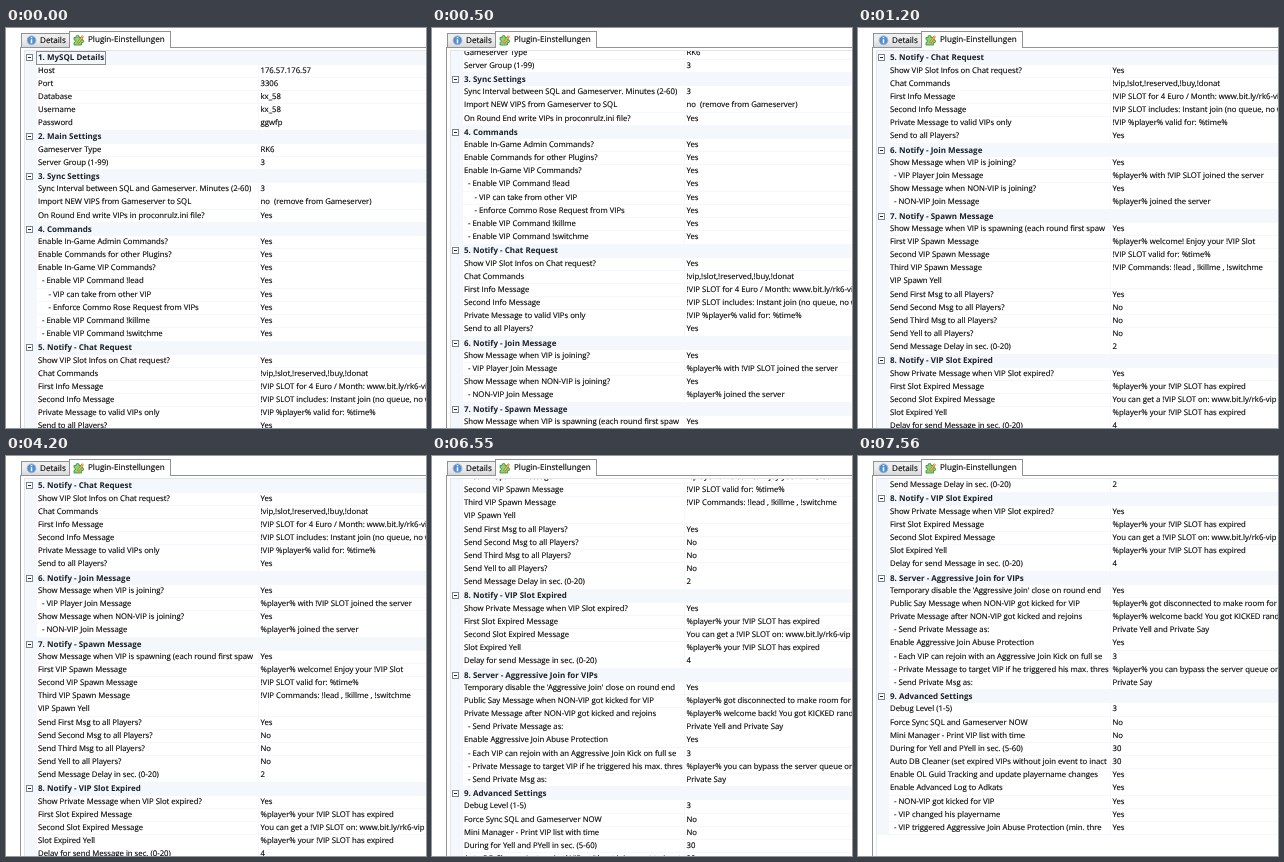
An HTML page for the animation above (8000 ms loop, 420x400 px).

```html
<!DOCTYPE html>
<html lang="de">
<head>
<meta charset="utf-8">
<title>Plugin-Einstellungen</title>
<style>
  html, body { margin: 0; width: 100%; height: 100%; overflow: hidden; background: #fff; }
  #stage {
    position: relative; width: 420px; height: 400px; overflow: hidden; background: #fff;
    font: 7.75px "Open Sans", "Noto Sans", sans-serif; color: #000;
    -webkit-text-stroke: 0.13px #000; text-rendering: geometricPrecision; white-space: pre;
  }
  #stage div, #stage svg { position: absolute; }
  #page { left: 14px; top: 19px; width: 420px; height: 400px; border: 1px solid #8f9296; box-sizing: border-box; }
  .tab { box-sizing: border-box; border: 1px solid #8f9296; font-size: 8.1px; }
  .tab span { position: absolute; line-height: 12px; }
  #details { left: 15px; top: 5px; width: 49px; height: 15px; background: linear-gradient(#eee 45%, #d8d8d8); }
  #details span { left: 18px; top: 1px; }
  #plugin { left: 63px; top: 3px; width: 102px; height: 17px; background: #fff; border-bottom: 0; }
  #plugin span { left: 18px; top: 2px; }
  #view { left: 18px; top: 22px; width: 402px; height: 378px; overflow: hidden; border: solid #e4e6ea; border-width: 1px 0 0 1px; box-sizing: border-box; }
  #list { left: 0; top: 0.4px; width: 401px; }
  .row { left: 0; width: 401px; height: 13.18px; line-height: 13.18px; background: #f4f7fc; }
  .row div { top: 0; height: 12.4px; overflow: hidden; background: #fff; }
  .row .name { left: 12px; width: 220.5px; box-sizing: border-box; padding-left: 1px; }
  .row .value { left: 233.5px; width: 168px; padding-left: 2px; }
  .row b { position: absolute; left: 13px; font-size: 8px; color: #1d2026; -webkit-text-stroke: 0; }
  .row:first-child b { left: 11px; top: 0; padding: 0 1px; height: 12px; line-height: 12px; border: 1px solid #8a8d92; }
  .row i { position: absolute; left: 1px; top: 3px; width: 5px; height: 5px; border: 1px solid #7d838b; background: #fff; }
  .row i::after { content: ""; position: absolute; left: 1px; top: 2px; width: 3px; height: 1px; background: #222; }
</style>
</head>
<body>
<div id="stage">
  <div id="page"></div>
  <div id="view"><div id="list"></div></div>
  <div class="tab" id="details"><span>Details</span></div>
  <div class="tab" id="plugin"><span>Plugin-Einstellungen</span></div>
  <svg width="90" height="24" style="left:0;top:0">
    <circle cx="25.5" cy="12.3" r="4.4" fill="#4f8fd0" stroke="#9fb3c8"/>
    <path d="M25.5 11.3v4M25.5 9v1.3" stroke="#fff" stroke-width="1.5"/>
    <path d="M68 9.500h2.200a1.500 1.500 0 1 1 2.800 0H75.500v2.300a1.500 1.500 0 1 1 0 2.800V17h-7.500v-2.500a1.400 1.400 0 1 0 0-2.800z" fill="#8fd07a" stroke="#3b9a35" stroke-width=".9"/>
    <path d="M72 15l5-7" stroke="#b5732a" stroke-width="2.200"/>
    <path d="M72.300 14.500l4.700-6.500" stroke="#f5c65a" stroke-width="1.200"/>
  </svg>
</div>
<script>
// "#" marks a heading; ">" adds one indent level; "|" splits name and value
const rows = `#1. MySQL Details
Host|176.57.176.57
Port|3306
Database|kx_58
Username|kx_58
Password|ggwfp
#2. Main Settings
Gameserver Type|RK6
Server Group (1-99)|3
#3. Sync Settings
Sync Interval between SQL and Gameserver. Minutes (2-60)|3
Import NEW VIPS from Gameserver to SQL|no  (remove from Gameserver)
On Round End write VIPs in proconrulz.ini file?|Yes
#4. Commands
Enable In-Game Admin Commands?|Yes
Enable Commands for other Plugins?|Yes
Enable In-Game VIP Commands?|Yes
>Enable VIP Command !lead|Yes
>>VIP can take from other VIP|Yes
>>Enforce Commo Rose Request from VIPs|Yes
>Enable VIP Command !killme|Yes
>Enable VIP Command !switchme|Yes
#5. Notify - Chat Request
Show VIP Slot Infos on Chat request?|Yes
Chat Commands|!vip,!slot,!reserved,!buy,!donat
First Info Message|!VIP SLOT for 4 Euro / Month: www.bit.ly/rk6-vip
Second Info Message|!VIP SLOT includes: Instant join (no queue, no wait)
Private Message to valid VIPs only|!VIP %player% valid for: %time%
Send to all Players?|Yes
#6. Notify - Join Message
Show Message when VIP is joining?|Yes
>VIP Player Join Message|%player% with !VIP SLOT joined the server
Show Message when NON-VIP is joining?|Yes
>NON-VIP Join Message|%player% joined the server
#7. Notify - Spawn Message
Show Message when VIP is spawning (each round first spaw|Yes
First VIP Spawn Message|%player% welcome! Enjoy your !VIP Slot
Second VIP Spawn Message|!VIP SLOT valid for: %time%
Third VIP Spawn Message|!VIP Commands: !lead , !killme , !switchme
VIP Spawn Yell|
Send First Msg to all Players?|Yes
Send Second Msg to all Players?|No
Send Third Msg to all Players?|No
Send Yell to all Players?|No
Send Message Delay in sec. (0-20)|2
#8. Notify - VIP Slot Expired
Show Private Message when VIP Slot expired?|Yes
First Slot Expired Message|%player% your !VIP SLOT has expired
Second Slot Expired Message|You can get a !VIP SLOT on: www.bit.ly/rk6-vip
Slot Expired Yell|%player% your !VIP SLOT has expired
Delay for send Message in sec. (0-20)|4
#8. Server - Aggressive Join for VIPs
Temporary disable the 'Aggressive Join' close on round end|Yes
Public Say Message when NON-VIP got kicked for VIP|%player% got disconnected to make room for VIP
Private Message after NON-VIP got kicked and rejoins|%player% welcome back! You got KICKED randomly
>Send Private Message as:|Private Yell and Private Say
Enable Aggressive Join Abuse Protection|Yes
>Each VIP can rejoin with an Aggressive Join Kick on full se|3
>Private Message to target VIP if he triggered his max. thres|%player% you can bypass the server queue only
>Send Private Msg as:|Private Say
#9. Advanced Settings
Debug Level (1-5)|3
Force Sync SQL and Gameserver NOW|No
Mini Manager - Print VIP list with time|No
During for Yell and PYell in sec. (5-60)|30
Auto DB Cleaner (set expired VIPs without join event to inact|30
Enable OL Guid Tracking and update playername changes|Yes
Enable Advanced Log to Adkats|Yes
>NON-VIP got kicked for VIP|Yes
>VIP changed his playername|Yes
>VIP triggered Aggressive Join Abuse Protection (min. thre|Yes`.split("\n");

const rowHeight = 13.18;
const page = rowHeight * 22 / 3;
const loop = 8000;
const list = document.getElementById("list");

function add(parent, tag, text = "", className = "") {
  const el = document.createElement(tag);
  el.textContent = text;
  if (className) el.className = className;
  return parent.appendChild(el);
}

rows.forEach((line, i) => {
  const row = add(list, "div", "", "row");
  row.style.top = i * rowHeight + "px";
  if (line[0] === "#") {
    add(row, "i");
    add(row, "b", line.slice(1));
    return;
  }
  const [label, value] = line.split("|");
  const level = label.lastIndexOf(">") + 1;
  const name = add(row, "div", (level ? "- " : "") + label.slice(level), "name");
  name.style.paddingLeft = [1, 5, 11.5][level] + "px";
  add(row, "div", value, "value");
});

// each step scrolls a third of 22 rows, in whole pixels to keep text sharp
const starts = [0, 500, 850, 1200, 6200, 6550, 6900, loop];
list.animate(starts.map((t, i) => ({
  offset: t / loop,
  transform: `translateY(${-Math.round(page * Math.min(i, 6))}px)`,
  easing: "step-end"
})), { duration: loop, iterations: Infinity });
</script>
</body>
</html>
```
